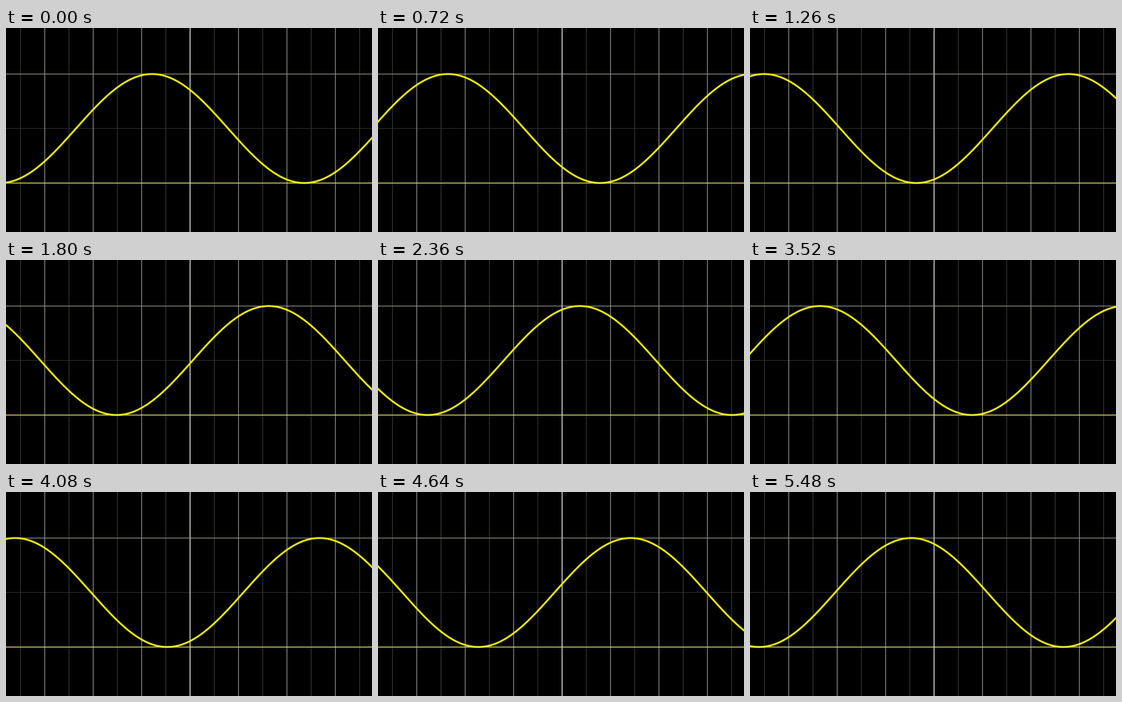
A matplotlib script for the animation above (5500 ms loop, 680x380 px).

```python
import numpy as np
import matplotlib.pyplot as plt
from matplotlib.animation import FuncAnimation

W, H, DPI = 680, 380, 100
PX = 72 / DPI                   # points per pixel
X0, UNIT = 342, 90              # vertical axis and pixels per radian
MID, AMP = 187.25, 101.5
TICK, TICKS = 20, 275           # 5500 ms loop

fig = plt.figure(figsize=(W / DPI, H / DPI), dpi=DPI, facecolor="black")
ax = fig.add_axes([0, 0, 1, 1])
ax.set_xlim(0, W)
ax.set_ylim(H, 0)
ax.axis("off")


def vline(x, color, width):
    ax.axvline(x, color=color, lw=width * PX, snap=False, zorder=1)


def hline(y, color, width, alpha=1, z=1):
    ax.axhline(y, color=color, lw=width * PX, alpha=alpha, snap=False, zorder=z)


# Grid: faint half units, grey whole units, bright axis
hline(MID, "#2c2c2c", 1.3)
for k in range(-4, 4):
    vline(X0 + (k + 0.5) * UNIT, "#3c3c3c", 1.3)
hline(MID - AMP, "#98a094", 1.3)
for k in range(-3, 4):
    if k:
        vline(X0 + k * UNIT, "#a0a0a0", 1.3)
vline(X0, "#c4c4c4", 1.9)

# Yellow base line, with a pale sheen that also lies over the wave
hline(MID + AMP, "#d8d800", 1.4)
hline(MID + AMP, "white", 1.3, alpha=0.45, z=5)

xs = np.linspace(-4, W + 4, 460)
theta = (xs - X0) / UNIT
glow, = ax.plot([], [], color="#ffff00", alpha=0.28, lw=4.8 * PX, zorder=3)
wave, = ax.plot([], [], color="#f6f610", lw=2.7 * PX, zorder=4)


def pose(tick):
    """Poses are held for 20, 100 and 20 ms in turn; the first one twice."""
    group, r = divmod(tick, 7)
    return max(3 * group + (r > 0) + (r == 6), 1)


def update(tick):
    phase = np.pi / 4 + (pose(tick) - 1) * 2 * np.pi / 60
    ys = MID - AMP * np.cos(theta + phase)
    for line in (glow, wave):
        line.set_data(xs, ys)
    return glow, wave


anim = FuncAnimation(fig, update, frames=TICKS, interval=TICK,
                     repeat=True, repeat_delay=0, blit=False)
plt.show()
```
